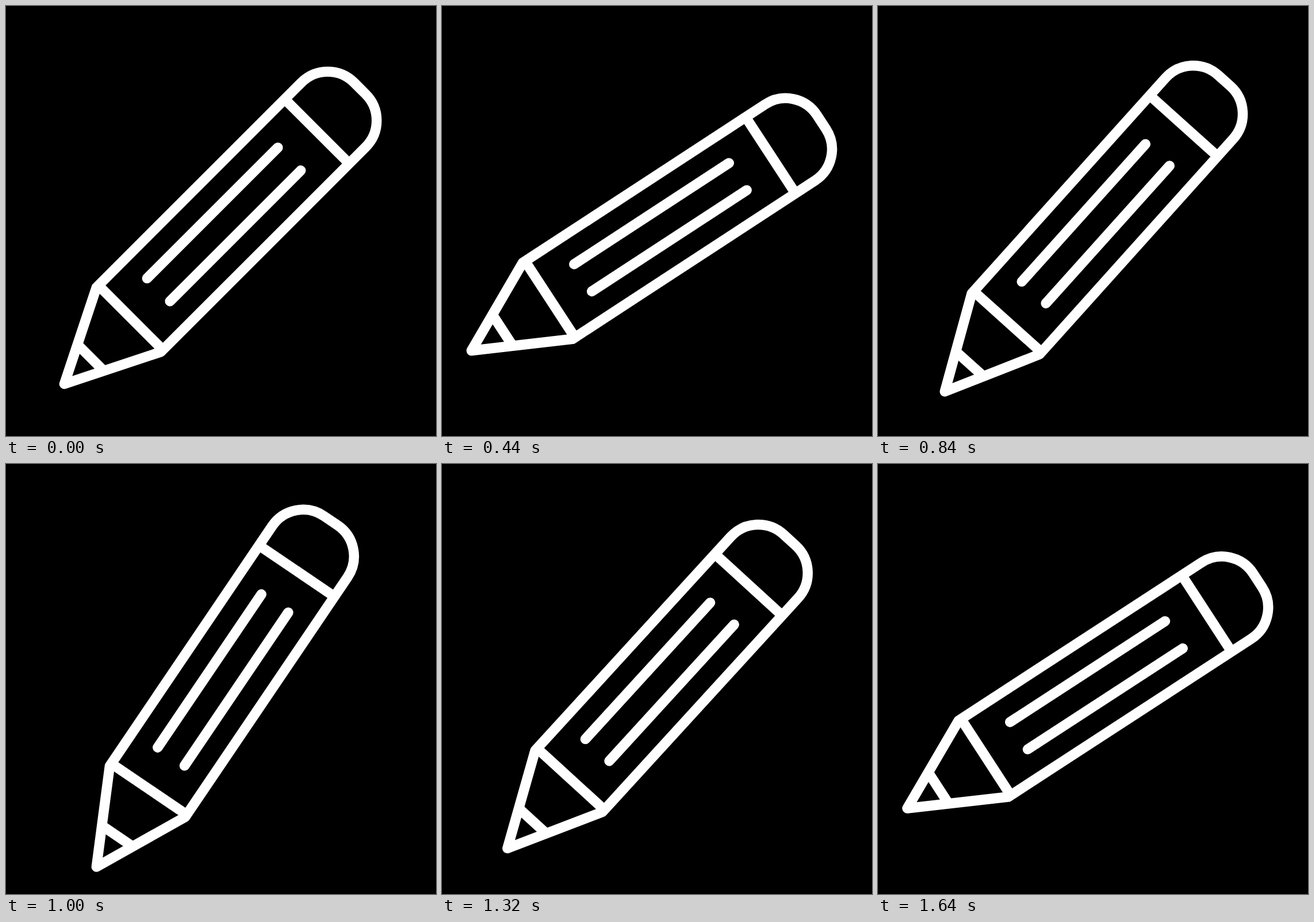
Recreate the animation shown at these times as an HTML page. Size 748 by 748 pixels, loop 1.76 s.

```html
<!DOCTYPE html>
<html lang="en">
<head>
<meta charset="utf-8">
<title>Wiggling pencil</title>
<style>
  html, body { margin: 0; height: 100%; overflow: hidden; background: #000; }
  svg { display: block; width: 100vw; height: 100vh; }
</style>
</head>
<body>
<svg viewBox="0 0 748 748">
  <g id="pencil" fill="none" stroke="#fff" stroke-width="17.5" stroke-linejoin="round">
    <!-- Drawn lying along the x axis, tip to the left -->
    <g transform="translate(379.5 379.5) rotate(-45)">
      <path d="M-393.2 0 L-235 -79.2 H269 a65 65 0 0 1 65 65 V14.2 a65 65 0 0 1 -65 65 H-235 Z"/>
      <path d="M-328.5 -32 V32 M-230 -79 V79 M228.3 -79 V79"/>
      <path d="M-161.5 -28.2 H160.3 M-161.5 28.2 H160.3" stroke-linecap="round"/>
    </g>
  </g>
</svg>
<script>
  const LOOP = 1760, STEP = 40, LAST = 1640;
  const PIVOT = "356 386.5";
  const pencil = document.getElementById("pencil");

  // Swings between rest angles; skew shifts the easing earlier or later
  const swings = [
    { start: 0, end: 463, from: 0, to: 11.95, skew: 1.12 },
    { start: 463, end: 1143, from: 11.95, to: -13.85, skew: 1 },
    { start: 1143, end: LAST, from: -13.85, to: 11.95, skew: 0.755 },
  ];

  function angleAt(time) {
    const { start, end, from, to, skew } = swings.find(s => time <= s.end);
    const u = ((time - start) / (end - start)) ** skew;
    return from + (to - from) * u * u * (3 - 2 * u);
  }

  function draw() {
    const time = performance.now() % LOOP;
    const held = Math.min(LAST, Math.floor(time / STEP) * STEP);
    pencil.setAttribute("transform", `rotate(${angleAt(held)} ${PIVOT})`);
    requestAnimationFrame(draw);
  }
  draw();
</script>
</body>
</html>
```
